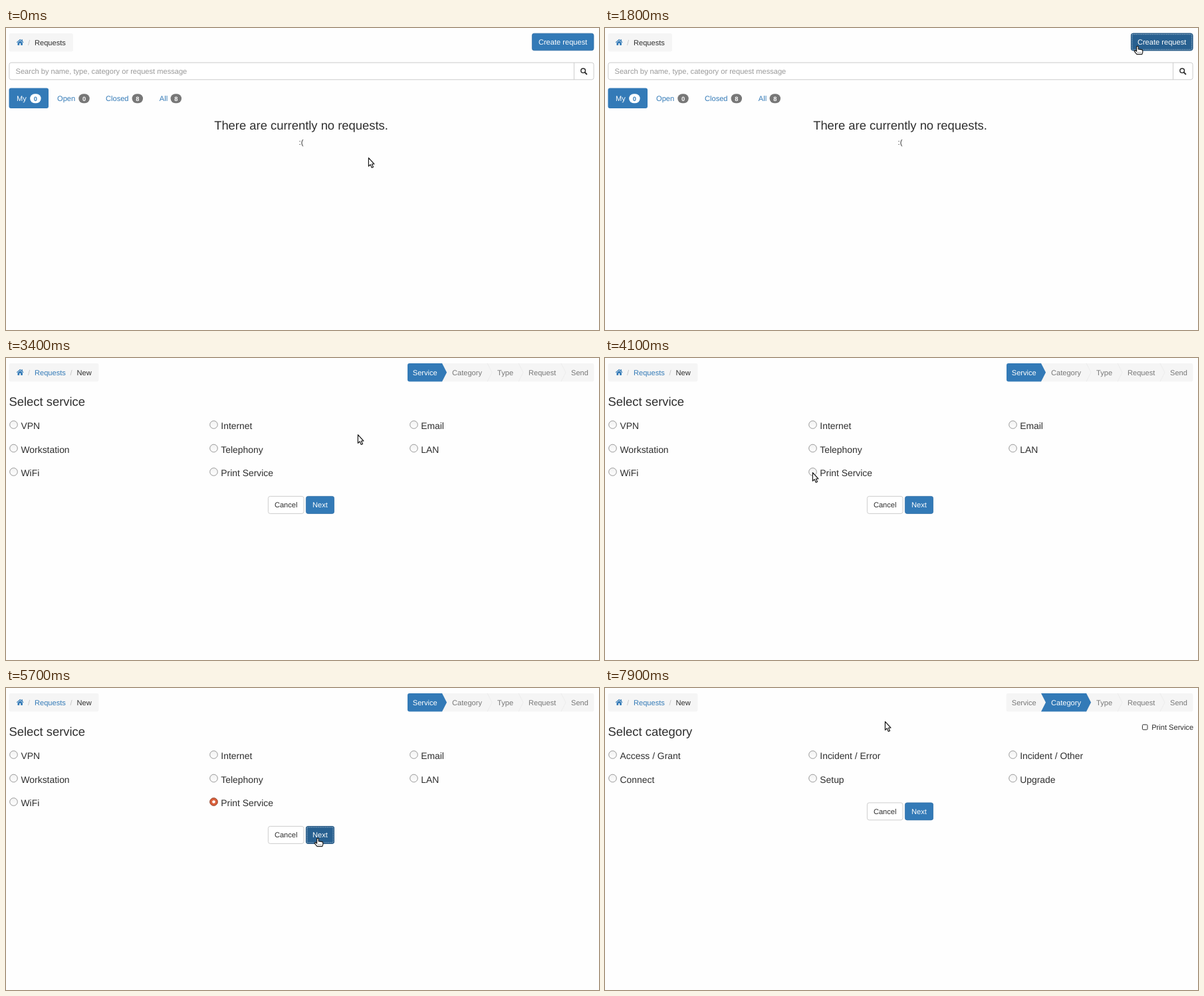
Write an HTML page that moves like this. It is 892 by 455 pixels and loops after 8000 ms.

```html
<!DOCTYPE html>
<html lang="en">
<head>
<meta charset="utf-8">
<title>Requests</title>
<style>
html, body { margin: 0; width: 100%; height: 100%; overflow: hidden; background: #fefefe; }
svg { display: block; width: 892px; height: 455px; }
text { font: 11.1px "Liberation Sans", Arial, sans-serif; fill: #2e2e2e; text-rendering: geometricPrecision; white-space: pre; }
.link { fill: #337ab7; }
.muted { fill: #777; }
.hint { fill: #999; }
.slash { fill: #c4c4c4; }
.white { fill: #fff; }
.mid { text-anchor: middle; }
.title { font-size: 18.4px; }
.label text { font-size: 13.9px; }
.badge { font-size: 9.3px; font-weight: bold; text-anchor: middle; }
.bar { fill: #f5f5f5; }
.blue { fill: #337ab7; }
.box { fill: #fff; stroke: #c8c8c8; stroke-width: .9; }
.primary { fill: #337ab7; stroke: #2e6da4; stroke-width: .8; }
.pressed { fill: #286090; stroke: #204d74; stroke-width: .8; }
.ring { fill: none; stroke: #d5e2ec; stroke-width: .8; stroke-dasharray: .8 .8; }
.chevron { fill: none; stroke: #eaeaea; stroke-width: .8; }

/* Everything runs on one 8 s clock */
.t { animation: 8s step-end infinite; }
.list { animation-name: list; }
.service { animation-name: service; }
.category { animation-name: category; }
.createHover { animation-name: createHover; }
.createFocus { animation-name: createFocus; }
.nextHover { animation-name: nextHover; }
.nextFocus { animation-name: nextFocus; }
.checked { animation-name: checked; }
.radioFocus { animation-name: radioFocus; }
.arrow { animation-name: arrow; }
.beam { animation-name: beam; }
.hand { animation-name: hand; }
.pointer { animation-name: move; }

@keyframes list { 0% { opacity: 1 } 31.25%, 100% { opacity: 0 } }
@keyframes service { 0% { opacity: 0 } 31.25% { opacity: 1 } 76.25%, 100% { opacity: 0 } }
@keyframes category { 0% { opacity: 0 } 76.25%, 100% { opacity: 1 } }
@keyframes createHover { 0% { opacity: 0 } 17.5%, 100% { opacity: 1 } }
@keyframes createFocus { 0% { opacity: 0 } 21.25%, 100% { opacity: 1 } }
@keyframes nextHover { 0% { opacity: 0 } 68.75%, 100% { opacity: 1 } }
@keyframes nextFocus { 0% { opacity: 0 } 70%, 100% { opacity: 1 } }
@keyframes checked { 0% { opacity: 0 } 53.75%, 100% { opacity: 1 } }
@keyframes radioFocus { 0% { opacity: 0 } 53.75% { opacity: 1 } 70%, 100% { opacity: 0 } }
@keyframes hand {
  0%, 31.25%, 76.25%, 100% { opacity: 0 }
  17.5%, 68.75% { opacity: 1 }
}
@keyframes beam {
  0%, 51.25%, 63.75%, 100% { opacity: 0 }
  47.5%, 61.25% { opacity: 1 }
}
@keyframes arrow {
  0%, 31.25%, 51.25%, 63.75%, 76.25%, 100% { opacity: 1 }
  17.5%, 47.5%, 61.25%, 68.75% { opacity: 0 }
}
/* The pointer advances once every 100 ms */
@keyframes move {
  0% { transform: translate(545px, 195px) }
  7.5% { transform: translate(545px, 195px); animation-timing-function: steps(3, start) }
  11.25% { transform: translate(585px, 167px); animation-timing-function: steps(4, start) }
  16.25% { transform: translate(770px, 50px); animation-timing-function: steps(2, start) }
  18.75% { transform: translate(802px, 27px) }
  36.25% { transform: translate(802px, 27px); animation-timing-function: steps(2, start) }
  38.75% { transform: translate(770px, 36px); animation-timing-function: steps(4, start) }
  43.75% { transform: translate(529px, 115px); animation-timing-function: steps(3, start) }
  47.5% { transform: translate(400px, 160px); animation-timing-function: steps(4, start) }
  52.5% { transform: translate(312px, 172px) }
  58.75% { transform: translate(312px, 172px); animation-timing-function: steps(4, start) }
  63.75% { transform: translate(325px, 181px); animation-timing-function: steps(4, start) }
  68.75% { transform: translate(446px, 219px); animation-timing-function: steps(1, start) }
  70% { transform: translate(470px, 226px) }
  82.5% { transform: translate(470px, 226px); animation-timing-function: steps(2, start) }
  85% { transform: translate(464px, 203px); animation-timing-function: steps(4, start) }
  90% { transform: translate(428px, 71px); animation-timing-function: steps(8, start) }
  100% { transform: translate(421px, 50px) }
}
</style>
</head>
<body>
<svg viewBox="0 0 892 455">
  <defs>
    <linearGradient id="shade" x2="0" y2="1">
      <stop stop-color="#f1f1f1"/><stop offset="1" stop-color="#fff"/>
    </linearGradient>
    <circle id="radio" cx="11.5" cy="100.5" r="5.8" fill="url(#shade)" stroke="#8c8c8c" stroke-width=".9"/>
    <path id="home" class="blue" d="M15.8 21.6 21.2 16.8 23.4 18.7V17.3H24.9V20L26.6 21.6 25.9 22.3 21.2 18.2 16.5 22.3ZM17.5 22.3 21.2 19.1 24.9 22.3V25.9H22.2V23.1H20.2V25.9H17.5Z"/>
    <g id="crumbs">
      <rect class="bar" x="4.5" y="8" width="135" height="27.5" rx="3"/>
      <use href="#home"/>
      <text class="slash" x="33" y="25.5">/</text>
      <text class="link" x="43" y="25.5">Requests</text>
      <text class="slash" x="96.5" y="25.5">/</text>
      <text x="106.5" y="25.5">New</text>
    </g>
    <g id="steps">
      <rect class="bar" x="603.5" y="8" width="281" height="27.5" rx="3"/>
      <path class="chevron" d="M724 8l7 13.75-7 13.75M771 8l7 13.75-7 13.75M835 8l7 13.75-7 13.75"/>
      <text class="muted" x="739" y="25.5">Type</text>
      <text class="muted" x="786" y="25.5">Request</text>
      <text class="muted" x="850" y="25.5">Send</text>
    </g>
    <g id="buttons">
      <rect class="box" x="394.4" y="208.4" width="53.6" height="26" rx="3"/>
      <text class="mid" x="421.2" y="225.4">Cancel</text>
      <rect class="primary" x="451.4" y="208.4" width="42.2" height="26" rx="3"/>
      <text class="mid white" x="472.5" y="225.4">Next</text>
    </g>
  </defs>

  <g class="t list">
    <rect class="bar" x="4.5" y="8" width="96.5" height="27.5" rx="3"/>
    <use href="#home"/>
    <text class="slash" x="33" y="25.5">/</text>
    <text x="43" y="25.5">Requests</text>

    <rect class="primary" x="791.4" y="8.2" width="92.6" height="25.6" rx="3"/>
    <rect class="pressed t createHover" x="791.4" y="8.2" width="92.6" height="25.6" rx="3"/>
    <rect class="ring t createFocus" x="792.8" y="9.6" width="89.8" height="22.8"/>
    <text class="mid white" x="837.6" y="25">Create request</text>

    <rect class="box" x="4.9" y="52.2" width="879.2" height="25.6" rx="3"/>
    <path class="box" d="M854.5 52.2v25.6"/>
    <text class="hint" x="14.5" y="69">Search by name, type, category or request message</text>
    <g fill="none" stroke="#2e2e2e">
      <circle cx="868.2" cy="64.3" r="3.3" stroke-width="1.5"/>
      <path d="M870.7 66.8l2.7 2.7" stroke-width="1.9" stroke-linecap="round"/>
    </g>

    <rect class="blue" x="4.5" y="90.5" width="59.5" height="30.5" rx="3"/>
    <text class="white" x="16" y="109.7">My</text>
    <rect class="white" x="36.2" y="99.2" width="16.4" height="14" rx="7"/>
    <text class="badge link" x="44.4" y="109.5">0</text>
    <text class="link" x="77" y="109.7">Open</text>
    <rect class="muted" x="109.3" y="99.2" width="16.4" height="14" rx="7"/>
    <text class="badge white" x="117.5" y="109.5">0</text>
    <text class="link" x="150" y="109.7">Closed</text>
    <rect class="muted" x="189.6" y="99.2" width="16.4" height="14" rx="7"/>
    <text class="badge white" x="197.8" y="109.5">8</text>
    <text class="link" x="230.8" y="109.7">All</text>
    <rect class="muted" x="247.6" y="99.2" width="16.4" height="14" rx="7"/>
    <text class="badge white" x="255.8" y="109.5">8</text>

    <text class="title mid" x="444" y="153.2">There are currently no requests.</text>
    <text class="mid" x="444" y="176">:(</text>
  </g>

  <g class="t service">
    <use href="#crumbs"/>
    <use href="#steps"/>
    <path class="blue" d="M607 8H656L663 21.75 656 35.5H607Q604 35.5 604 32.5V11Q604 8 607 8Z"/>
    <text class="white" x="611.8" y="25.5">Service</text>
    <text class="muted" x="671" y="25.5">Category</text>
    <text class="title" x="4.5" y="71.6">Select service</text>
    <g class="label">
      <use href="#radio"/><text x="22.5" y="107.4">VPN</text>
      <use href="#radio" x="301"/><text x="323.3" y="107.4">Internet</text>
      <use href="#radio" x="602"/><text x="624.2" y="107.4">Email</text>
      <use href="#radio" y="35.5"/><text x="22.5" y="142.9">Workstation</text>
      <use href="#radio" x="301" y="35.5"/><text x="323.3" y="142.9">Telephony</text>
      <use href="#radio" x="602" y="35.5"/><text x="624.2" y="142.9">LAN</text>
      <use href="#radio" y="71"/><text x="22.5" y="178.4">WiFi</text>
      <use href="#radio" x="301" y="71"/><text x="323.3" y="178.4">Print Service</text>
    </g>
    <g class="t checked">
      <circle cx="312.5" cy="171.5" r="5.8" fill="#d95f3b" stroke="#a1482c" stroke-width=".9"/>
      <circle cx="312.5" cy="171.5" r="2.3" fill="#fff"/>
    </g>
    <rect class="t radioFocus" x="306.5" y="165.5" width="12" height="12" fill="none" stroke="#555" stroke-width=".8" stroke-dasharray="1 1"/>
    <use href="#buttons"/>
    <g class="t nextHover">
      <rect class="pressed" x="451.4" y="208.4" width="42.2" height="26" rx="3"/>
      <rect class="ring t nextFocus" x="452.8" y="209.8" width="39.4" height="23.2"/>
      <text class="mid white" x="472.5" y="225.4">Next</text>
    </g>
  </g>

  <g class="t category">
    <use href="#crumbs"/>
    <use href="#steps"/>
    <path class="blue" d="M656 8H724L731 21.75 724 35.5H656L663 21.75Z"/>
    <text class="muted" x="611.8" y="25.5">Service</text>
    <text class="white" x="671" y="25.5">Category</text>
    <text class="title" x="4.5" y="71.6">Select category</text>
    <rect x="808.4" y="55.2" width="7.6" height="7.6" rx="1.5" fill="none" stroke="#2e2e2e"/>
    <text x="822.2" y="63.2">Print Service</text>
    <g class="label">
      <use href="#radio"/><text x="22.5" y="107.4">Access / Grant</text>
      <use href="#radio" x="301"/><text x="323.3" y="107.4">Incident / Error</text>
      <use href="#radio" x="602"/><text x="624.2" y="107.4">Incident / Other</text>
      <use href="#radio" y="35.5"/><text x="22.5" y="142.9">Connect</text>
      <use href="#radio" x="301" y="35.5"/><text x="323.3" y="142.9">Setup</text>
      <use href="#radio" x="602" y="35.5"/><text x="624.2" y="142.9">Upgrade</text>
    </g>
    <use href="#buttons" y="-35.5"/>
  </g>

  <g class="t pointer" stroke-linejoin="round">
    <path class="t arrow" d="M.4.6V13.3L3.2 10.8 5.3 15.5 7.5 14.5 5.4 10H8.9Z" fill="#fff" stroke="#1c1c1c" stroke-width="1.2"/>
    <g class="t beam" fill="none">
      <path d="M-2.5-6.5H2.5M-2.5 6.5H2.5M0-6.5V6.5" stroke="#fff" stroke-width="3"/>
      <path d="M-2.5-6.5H2.5M-2.5 6.5H2.5M0-6.5V6.5" stroke="#1c1c1c" stroke-width="1.3"/>
    </g>
    <g class="t hand" stroke="#1c1c1c">
      <path d="M-2.4 1.2Q-1.1-.6.2 1.2V4.8L5.4 5.6Q6.8 6 6.8 7.4V9.6L5.8 12.6H-2L-5.6 8.4Q-6 6.6-4.3 6.7L-2.4 8.2Z" fill="#fff" stroke-width="1.2"/>
      <path d="M-1 10H5" stroke-width=".9" stroke-dasharray="1 1.2"/>
    </g>
  </g>
</svg>
</body>
</html>
```
